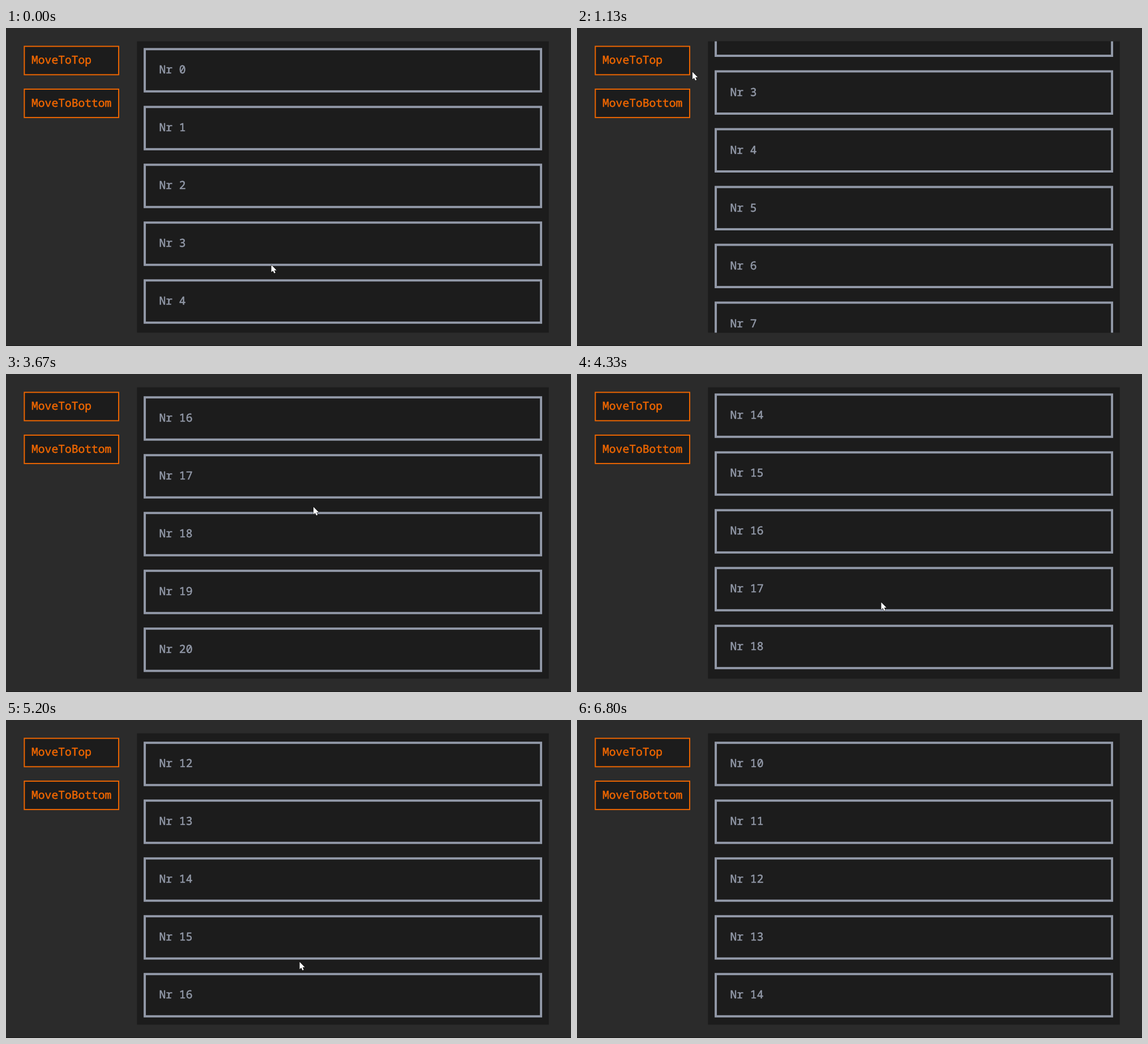
Write an HTML page that moves like this. It is 998 px wide and 561 px high and loops after 7340 ms.

```html
<!DOCTYPE html>
<html lang="en">
<head>
<meta charset="utf-8">
<title>List scrolling</title>
<style>
  html, body { margin: 0; width: 100%; height: 100%; overflow: hidden; background: #2b2b2b; }
  svg { display: block; width: 100vw; height: 100vh; }
  text {
    font: 500 20px "Noto Sans Mono", "DejaVu Sans Mono", monospace;
    text-rendering: geometricPrecision;
    white-space: pre;
    stroke-width: .55;
  }
  rect { fill: #1c1c1c; }
  .button rect { stroke: #ee6600; stroke-width: 2; }
  .button text { fill: #ee6600; stroke: #ee6600; }
  .item rect { stroke: #9299a8; stroke-width: 4; }
  .item text { fill: #9299a8; stroke: #9299a8; }
</style>
</head>
<body>
<svg viewBox="0 0 1018 572" preserveAspectRatio="none">
  <clipPath id="view"><rect x="236" y="24" width="742" height="524"/></clipPath>
  <rect y="571" width="1018" height="1"/>
  <rect x="236" y="24" width="742" height="524"/>
  <g class="button">
    <rect x="33" y="33" width="170" height="51"/>
    <text x="46" y="64.6">MoveToTop</text>
  </g>
  <g class="button" transform="translate(0 77)">
    <rect x="33" y="33" width="170" height="51"/>
    <text x="46" y="64.6">MoveToBottom</text>
  </g>
  <g clip-path="url(#view)"><g id="list"></g></g>
  <path id="cursor" d="M0 0V13.3L3 10.6L5.2 15.3L7.5 14.3L5.4 9.8H9.5Z"
        fill="#fff" stroke="#000" paint-order="stroke"/>
</svg>
<script>
  const LOOP = 7340, FRAME = 1000 / 15;
  const ITEMS = 21, PITCH = 104, BOTTOM = 1660;
  const TO_TOP = 1470, TO_BOTTOM = 2200;
  const list = document.getElementById('list');
  const cursor = document.getElementById('cursor');

  // Pointer turning points: time, x, y
  const path = [
    [0, 478, 426], [270, 472, 485], [800, 468, 213],
    [1130, 208, 79], [1330, 135, 70], [1670, 135, 70], [2070, 150, 131],
    [2530, 150, 131], [2900, 270, 86], [3670, 554, 239],
    [4200, 550, 442], [4745, 537, 223], [4930, 529, 435],
    [5400, 529, 435], [5530, 528, 431], [5670, 525, 388],
    [5930, 523, 495], [6130, 522, 334], [6400, 522, 435],
    [6730, 136, 555], [6800, 100, 600]
  ];
  // While the button is held, the list follows the pointer.
  const drags = [[270, 800], [3670, 4200], [4745, 4930], [5670, 5930], [6130, 6400]];

  function add(parent, tag, attrs, text) {
    const el = document.createElementNS('http://www.w3.org/2000/svg', tag);
    for (const key in attrs) el.setAttribute(key, attrs[key]);
    if (text) el.textContent = text;
    return parent.appendChild(el);
  }

  for (let i = 0; i < ITEMS; i++) {
    const item = add(list, 'g', { class: 'item', transform: `translate(0 ${i * PITCH})` });
    add(item, 'rect', { x: 250, y: 38, width: 714, height: 76 });
    add(item, 'text', { x: 276, y: 82 }, 'Nr ' + i);
  }

  function pointer(t) {
    const i = path.findIndex(point => point[0] > t);
    if (i < 0) return path[path.length - 1].slice(1);
    const [t0, x0, y0] = path[i - 1], [t1, x1, y1] = path[i];
    const p = (t - t0) / (t1 - t0), e = p * p * (3 - 2 * p);
    return [x0 + (x1 - x0) * e, y0 + (y1 - y0) * e];
  }

  function scrollAt(t) {
    const since = t < TO_TOP ? 0 : t < TO_BOTTOM ? TO_TOP : TO_BOTTOM;
    let offset = since === TO_BOTTOM ? BOTTOM : 0;
    for (const [from, to] of drags) {
      if (from >= since && from < t) offset += pointer(from)[1] - pointer(Math.min(t, to))[1];
    }
    return offset;
  }

  function draw(now) {
    // The screen updates 15 times a second on a 10 ms clock.
    const step = Math.floor((now % LOOP + 3.4) / FRAME);
    const t = Math.round(step * FRAME / 10) * 10;
    list.setAttribute('transform', `translate(0 ${-scrollAt(t)})`);
    cursor.setAttribute('transform', `translate(${pointer(t)})`);
  }

  const start = performance.now();
  function tick() {
    draw(performance.now() - start);
    requestAnimationFrame(tick);
  }
  tick();
</script>
</body>
</html>
```
